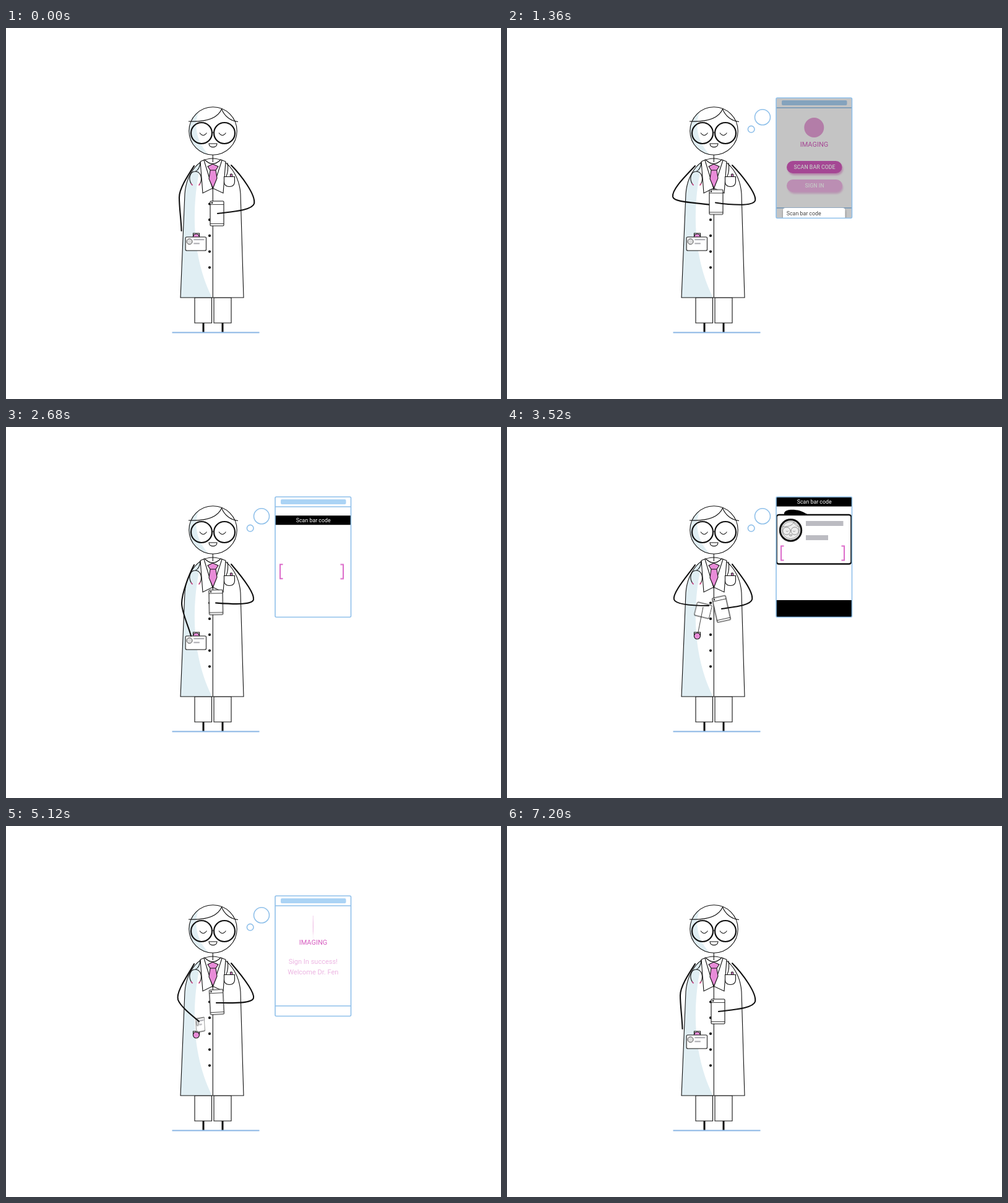
Recreate the animation shown at these times as an HTML page without scripts. Size 800 by 600 pixels, loop 7680 ms.

```html
<!DOCTYPE html>
<html lang="en">
<head>
<meta charset="utf-8">
<title>Badge sign-in</title>
<style>
html, body { margin: 0; width: 100%; height: 100%; overflow: hidden; background: #fff; }
svg { display: block; width: 800px; height: 600px; }
text { font-family: Roboto, Arial, sans-serif; font-size: 8.8px; }
.ink { fill: none; stroke: #111; stroke-width: 1.1; }
.white { fill: #fff; }
.shade { fill: #e0eef3; }
.sky { fill: none; stroke: #8fc0ea; stroke-width: 1.6; }
.pink { fill: #e88cd8; }
.mid { text-anchor: middle; }
.limb { fill: none; stroke: #111; stroke-width: 2.1; stroke-linecap: round; }
.mark { fill: none; stroke: #dc6cca; stroke-width: 2; }

.a { animation: 7680ms linear infinite both; }
.armL { animation-name: armL; }
.armR { animation-name: armR; }
.phone { animation-name: phone; }
.card { animation-name: card; }
.print { animation-name: print; }
.string { animation-name: string; }
.dot1, .dot2, .icon { transform-box: fill-box; transform-origin: center; }
.dot1 { animation-name: dot1; }
.dot2 { animation-name: dot2; }
.screen { animation-name: screen; transform-origin: 435px 160px; }
.buttons { animation-name: buttons; }
.icon { animation-name: icon; }
.welcome { animation-name: welcome; }
.dim { animation-name: dim; }
.sheet { animation-name: sheet; }
.pick { animation-name: pick; }
.scan { animation-name: scan; }
.view { animation-name: view; }
.edge { animation-name: edge; }

/* rest, hold phone, reach badge, show badge, put it back, rest */
@keyframes armL {
  0%, 80.73%, 100% { d: path("M304 223C293 240 280 260 280 274C280 290 283 310 283.5 328"); }
  0% { animation-timing-function: ease-in-out; }
  6.77%, 28.13% { d: path("M304 223C290 238 266 261 268 273C270 282 302 282 329 286"); }
  28.13% { animation-timing-function: ease-in-out; }
  33.85%, 35.4%, 71.35%, 72.92% { d: path("M304 223C295 240 284 270 284 285C284 300 295 322 299 338"); }
  35.4%, 72.92% { animation-timing-function: ease-in-out; }
  42.19%, 62.5% { d: path("M304 223C292 240 267 268 270 279C273 288 305 289 326 289"); }
  62.5% { animation-timing-function: ease-in; }
  66.67% { d: path("M304 223C295 240 274 268 278 281C282 292 300 306 312 316"); animation-timing-function: ease-out; }
}
@keyframes armR {
  0%, 91.15%, 100% { d: path("M364 222C380 238 404 270 401 284C398 295 365 297 342 300"); }
  0% { animation-timing-function: ease-in-out; }
  6.77%, 31.77%, 71.35%, 83.33% { d: path("M364 222C378 236 404 268 401 279C398 289 360 286 337 282.5"); }
  31.77% { animation-timing-function: ease-in; }
  83.33% { animation-timing-function: ease-in-out; }
  34.9% { d: path("M364 222C376 236 402 267 400 279C398 289 360 286 339 284.5"); animation-timing-function: ease-in-out; }
  42.19%, 62.5% { d: path("M364 222C375 236 399 266 396 279C393 289 365 291 347 294"); }
  62.5% { animation-timing-function: ease-in-out; }
  66.67% { d: path("M364 222C376 236 402 267 400 278C398 288 362 286 340 286"); animation-timing-function: ease-out; }
}
@keyframes phone {
  0%, 91.15%, 100% { transform: translate(341px, 300px) rotate(0deg); }
  0% { animation-timing-function: ease-in-out; }
  6.77%, 31.77%, 71.35%, 83.33% { transform: translate(338px, 281.5px) rotate(0deg); }
  31.77% { animation-timing-function: ease-in; }
  83.33% { animation-timing-function: ease-in-out; }
  34.9% { transform: translate(339.3px, 283.5px) rotate(-1deg); animation-timing-function: ease-in-out; }
  42.19%, 62.5% { transform: translate(346.5px, 294.3px) rotate(-12.5deg); }
  62.5% { animation-timing-function: ease-in-out; }
  66.67% { transform: translate(340.5px, 284.7px) rotate(-3deg); animation-timing-function: ease-out; }
}
@keyframes card {
  0%, 35.4%, 71.35%, 100% { transform: translate(306.8px, 349px) rotate(0deg) scaleX(1); }
  35.4% { animation-timing-function: ease-in-out; }
  42.19%, 62.5% { transform: translate(317px, 296.5px) rotate(14deg) scaleX(.73); }
  62.5% { animation-timing-function: ease-in; }
  66.67% { transform: translate(314.2px, 321.5px) rotate(-3deg) skewY(-8deg) scaleX(.42); animation-timing-function: ease-out; }
}
@keyframes print { 0%, 37.5%, 65.5%, 100% { opacity: 1; } 39%, 64.5% { opacity: 0; } }
@keyframes string {
  0%, 35.4%, 71.35%, 100% { d: path("M308 338L308 338"); }
  35.4% { animation-timing-function: ease-in-out; }
  42.19%, 62.5% { d: path("M308.5 334L317 291"); }
  62.5% { animation-timing-function: ease-in; }
  66.67% { d: path("M308 334L310 331"); animation-timing-function: ease-out; }
}
@keyframes dot1 { 0%, .5%, 93.3%, 100% { transform: scale(0); } 3.1%, 89.6% { transform: scale(1); } }
@keyframes dot2 { 0%, 2%, 90.6%, 100% { transform: scale(0); } 5.2%, 87.5% { transform: scale(1); } }
@keyframes screen {
  0%, 4.2%, 88.5%, 100% { transform: scale(0); }
  4.2% { animation-timing-function: ease-out; }
  8.1%, 84.9% { transform: scale(1.01); }
  9.4%, 83.85% { transform: scale(1); }
  84.9% { animation-timing-function: ease-in; }
}
@keyframes buttons { 0%, 62.49% { opacity: 1; } 62.5%, 100% { opacity: 0; } }
@keyframes icon {
  0%, 64.6% { transform: scaleX(1); animation-timing-function: ease-in; }
  66.67% { transform: scaleX(.02); animation-timing-function: ease-out; }
  68.75%, 100% { transform: scaleX(1); }
}
@keyframes welcome { 0%, 65.1% { opacity: 0; } 68.6%, 100% { opacity: 1; } }
@keyframes dim { 0%, 15.63%, 31.77%, 100% { opacity: 0; } 18.23%, 29.17% { opacity: .29; } }
@keyframes sheet {
  0%, 16.15%, 31.77%, 100% { transform: translateY(64px); }
  16.15% { animation-timing-function: ease-out; }
  20.31%, 29.17% { transform: none; }
  29.17% { animation-timing-function: ease-in; }
}
@keyframes pick { 0%, 22.92%, 31.77%, 100% { opacity: 0; } 24.48%, 31.7% { opacity: 1; } }
@keyframes scan {
  0%, 31.77% { transform: translateY(200px); animation-timing-function: ease-out; }
  34.9% { transform: translateY(30px); animation-timing-function: ease-out; }
  38.02%, 62.5% { transform: none; }
  62.5% { animation-timing-function: ease-in-out; }
  65.63%, 100% { transform: translateY(200px); }
}
@keyframes view {
  0%, 36.46% { transform: translateY(170px); animation-timing-function: ease-in-out; }
  42.19%, 100% { transform: none; }
}
@keyframes edge {
  0%, 38.02%, 45.83%, 100% { transform: none; }
  42.19% { transform: translateX(-29px); animation-timing-function: ease-out; }
}
</style>
</head>
<body>
<svg viewBox="0 0 800 600">
  <defs>
    <clipPath id="headClip"><circle cx="334.5" cy="166.5" r="38.7"/></clipPath>
    <path id="coat" d="M282 436L289 268C291 240 308 211 334 211C360 211 377 240 379 268L384 436Z"/>
    <clipPath id="coatClip"><use href="#coat"/></clipPath>
    <clipPath id="glass"><rect x="435" y="113" width="122.5" height="194.5" rx="2"/></clipPath>
    <filter id="soft" x="-20%" y="-40%" width="140%" height="180%"><feGaussianBlur stdDeviation="1.4"/></filter>
    <filter id="focus"><feGaussianBlur stdDeviation=".6"/></filter>
    <g id="face">
      <circle cx="334.5" cy="166.5" r="38.7"/>
      <path d="M295 151C320 152 342 147 348.500 131C353 143 364 151 375 151.500"/>
      <path d="M313 169.500q5.700 8 11.400 0M344 169.500q5.700 8 11.400 0M333 169.500q1.500-1.500 3 0"/>
      <path d="M328 187H341C341 194.500 328 194.500 328 187Z"/>
      <g stroke-width="2.200"><circle cx="316" cy="170" r="17"/><circle cx="353" cy="170" r="17"/></g>
    </g>
  </defs>

  <!-- legs and floor -->
  <path class="ink" d="M305 436H332.500V477H305ZM336 436H364V477H336Z"/>
  <path class="ink" style="stroke-width:3" d="M319 477V492M350 477V492"/>
  <path class="sky" style="stroke:#8ab6e4;stroke-width:2" d="M268.500 492.500H409.500"/>

  <!-- head -->
  <path class="shade" clip-path="url(#headClip)" d="M317 125C300 150 306 186 331 208H290V125Z"/>
  <use href="#face" class="ink"/>

  <!-- coat -->
  <use href="#coat" class="white"/>
  <path class="shade" clip-path="url(#coatClip)" d="M319 205C300 270 296 362 333 436H270V205Z"/>
  <use href="#coat" class="ink"/>
  <path class="ink" d="M334.300 205V217M334.300 258V436"/>
  <path class="ink white" d="M314 216L318 267L334 259L351 267L355 216L347 213Q334 226 321 213Z"/>
  <path class="ink" d="M320 214L334 260L349 214"/>
  <path class="ink pink" d="M330 230H339L341 243L334.500 259L328 244ZM326 224L334 220L343 224L339 230H330Z"/>
  <path class="ink" d="M358 218Q360 230 356 240"/>
  <rect class="ink pink" x="362.500" y="236" width="3" height="6" rx="1"/>
  <path class="ink white" d="M352.500 240.500H369.500V249Q369 256.500 361 256.500Q353 256.500 352.500 249Z"/>
  <path class="ink" d="M300 253C294 244 297 232 306 232C315 232 318 244 313 253M306 232Q313 229 314 217"/>
  <path class="ink" style="stroke:#c2407e;stroke-width:1.800" d="M299 251.500l2.500 3M314 251.500l-2.500 3"/>
  <path d="M329 284.500V388" fill="none" stroke="#111" stroke-width="4.200" stroke-linecap="round" stroke-dasharray="0 25.700"/>

  <!-- badge -->
  <path class="ink white" d="M302.500 332H312.500V338H302.500Z"/>
  <circle class="ink pink" cx="307.400" cy="338" r="5"/>
  <g class="a card">
    <rect class="ink white" x="-16.700" y="-11" width="33.400" height="22" rx="2"/>
    <g class="a print">
      <circle cx="-10.300" cy="-3.600" r="4.500" fill="#ddd" stroke="#444"/>
      <path d="M-3.500 -6.800H13.500M-3.500 -.500H6" stroke="#a8a8ae" stroke-width="2"/>
    </g>
  </g>
  <path class="ink a string" style="stroke-width:.8" d="M308 338L308 338"/>
  <path class="limb a armL" d="M304 223C293 240 280 260 280 274C280 290 283 310 283.500 328"/>

  <!-- handset -->
  <g class="a phone">
    <rect class="ink white" x="-11" y="-20" width="22" height="40" rx="1.500"/>
    <path class="ink" style="stroke-width:.8" d="M-11 -14.500H11M-11 16.500H11"/>
    <circle cx="-8" cy="-17.200" r="1.200"/>
  </g>
  <path class="limb a armR" d="M364 222C380 238 404 270 401 284C398 295 365 297 342 300"/>

  <!-- thought -->
  <circle class="sky a dot1" cx="394.700" cy="163.700" r="5.300"/>
  <circle class="sky a dot2" cx="413" cy="144.300" r="12.500"/>
  <g class="a screen">
    <g clip-path="url(#glass)">
      <rect class="white" x="435" y="113" width="123" height="195"/>
      <rect x="444" y="117" width="105.500" height="8" rx="2" fill="#abd3f5"/>
      <path class="sky" style="stroke-width:1.300" d="M435 129H558M435 291H558"/>
      <circle class="a icon" cx="496.300" cy="161" r="16" fill="#e9a3da"/>
      <text class="mid" x="496.500" y="191.500" style="font-size:11px" fill="#d65cc0">IMAGING</text>

      <g class="a buttons" font-weight="500">
        <rect x="454" y="218" width="89" height="20" rx="10" fill="#eab0dd" filter="url(#soft)"/>
        <rect x="452" y="215" width="89.500" height="20" rx="10" fill="#d65cc0"/>
        <text class="mid" x="497" y="228.200" fill="#fff">SCAN BAR CODE</text>
        <rect x="454" y="248" width="89" height="20" rx="10" fill="#f0c3e8" filter="url(#soft)"/>
        <rect x="452" y="245" width="90" height="20" rx="10" fill="#f3b8e8"/>
        <text class="mid" x="497" y="257.800" fill="#fff">SIGN IN</text>
      </g>
      <g class="a welcome mid" fill="#d65cc0">
        <text x="496.300" y="222.800" style="font-size:11px">Sign In success!</text>
        <text x="496.300" y="239.500" style="font-size:11px">Welcome Dr. Fen</text>
      </g>

      <rect class="a dim" x="435" y="113" width="123" height="195"/>
      <g class="a sheet">
        <g filter="url(#soft)" opacity=".4">
          <rect x="446" y="253" width="101" height="35" rx="4"/>
          <rect x="446" y="290" width="101" height="17" rx="4"/>
        </g>
        <rect class="white" x="446" y="251" width="100.500" height="35" rx="4"/>
        <rect class="white" x="446" y="288" width="100.500" height="17" rx="4"/>
        <g class="a pick">
          <path d="M446 269V255Q446 251 450 251H542.500Q546.500 251 546.500 255V269Z" fill="#dcdcdc"/>
          <circle cx="535.800" cy="259.700" r="4.500" fill="#3f86bd"/>
        </g>
        <text x="451.800" y="263" fill="#444">Scan bar code</text>
        <text x="452.500" y="278.800" fill="#222">More</text>
        <text class="mid" x="496.500" y="299.800" fill="#3f8fd2" font-weight="500">Cancel</text>
      </g>

      <g class="a scan">
        <rect class="white" x="435" y="114" width="123" height="195"/>
        <g class="a view" filter="url(#focus)">
          <path d="M448 142C446 132 464 133 472 135C480 137 484 142 490 142Z"/>
          <rect x="435.500" y="142" width="121" height="79.500" rx="4" fill="#fff" stroke="#111" stroke-width="2.600"/>
          <circle cx="458.500" cy="167" r="17.200" fill="#eee" stroke="#111" stroke-width="3"/>
          <use href="#face" transform="translate(458.500 167) scale(.36) translate(-334.500 -167)" fill="none" stroke="#777" stroke-width="2"/>
          <path d="M483 156H543.500M483 179H519" stroke="#bcbcc2" stroke-width="8"/>
        </g>
        <path d="M435 113.500H558V128.500H435ZM435 280H558V308H435Z"/>
        <text class="mid" x="496.700" y="123.700" fill="#fff">Scan bar code</text>
        <path class="mark" d="M447.500 192.500H443V215.500H447.500"/>
        <path class="mark a edge" d="M540.500 192.500H545V215.500H540.500"/>
      </g>
    </g>
    <rect class="sky" x="435" y="113" width="122.500" height="194.500" rx="2"/>
  </g>
</svg>
</body>
</html>
```
